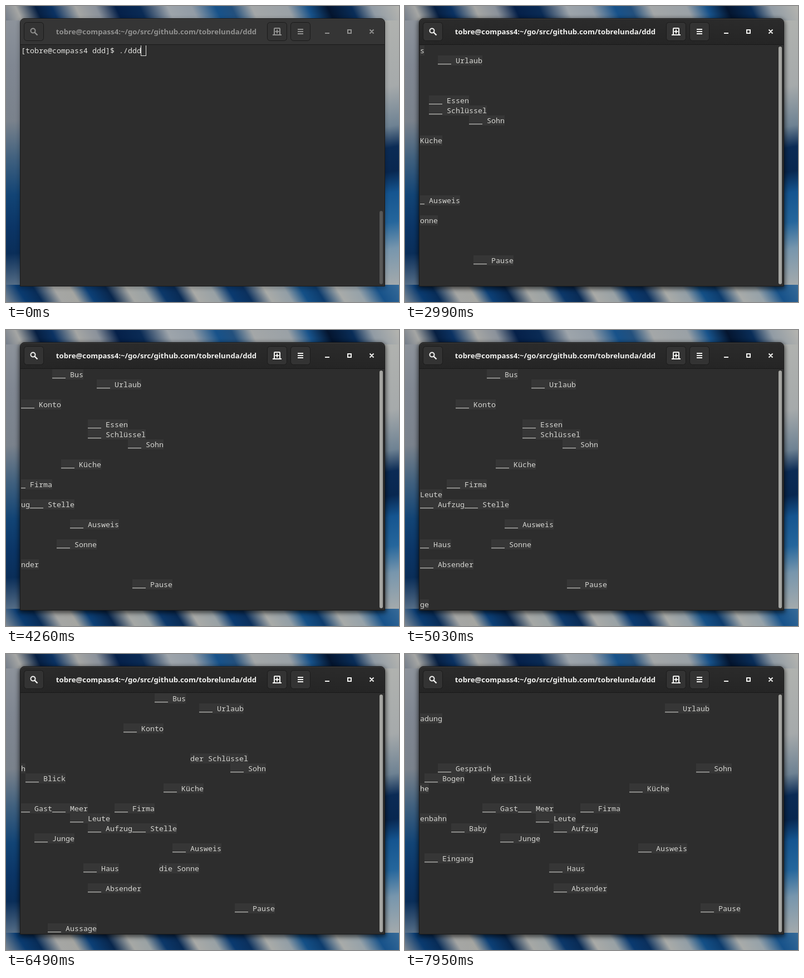
Recreate the animation shown at these times as an HTML page. Size 706 px wide and 533 px high, loop 8 s.

```html
<!DOCTYPE html>
<html lang="de">
<head>
<meta charset="utf-8">
<title>Terminal word game</title>
<style>
html, body { margin: 0; width: 100%; height: 100%; overflow: hidden; }
body {
  position: relative;
  --navy: #061f42; --blue: #17528a; --sand: #a5a6a4;
  background:
    linear-gradient(65deg, #747d8a, var(--sand) 4%, var(--navy) 9%, #0b3262 13%, var(--sand) 19%, #8b929b 24%, #052049 29%, #0a2b55 35%, #9ea5ab 42%, #929ca6 48%, var(--blue) 54%, #23507d 58%, #a4a7a8 63%, #9aa1a6 72%, var(--blue) 77%, #04152f 82%, #092d58 88%, #919ba4 93%, #b5b5b0) 0 0 / 706px 26px no-repeat,
    linear-gradient(58deg, #7e8994, #0a3b70 5%, #082c57 9%, var(--sand) 14%, #a4a5a1 18%, #0c4077 22%, #08264c 27%, #a6a8a5 32%, #9aa2a4 36%, #0c386a 40%, #092b55 44%, #a9aaa7 48%, #98a1a5 53%, #0a3a70 57%, #0b305d 61%, #a9aba8 66%, #929ea6 71%, #145087 75%, #0d3c6d 79%, #a8aba9 84%, #96a2a9 89%, var(--blue) 94%, #376b98) 0 502px / 706px 31px no-repeat,
    linear-gradient(177deg, #8d939b, #808792 17%, #7a828c 38%, #41617f 52%, #124475 66%, #0b3566 78%, #0a2e59 88%, #566e87) 0 26px / 27px 476px no-repeat,
    linear-gradient(170deg, #b0b2af, #a6aaab 25%, #6e8293 40%, #0b2b55 48%, #082750 57%, #155590 65%, #25669c 76%, #7796ad 86%, #a4aaac) 679px 26px / 27px 476px no-repeat,
    var(--navy);
}
#window {
  --f: 0;
  --ink: color-mix(in srgb, #f2f2f0 calc(var(--f) * 100%), #919190);
  position: absolute; left: 25px; top: 22px; width: 654px; height: 481px;
  border: 1px solid #1a1a1a; border-radius: 8px 8px 0 0; background: #2d2d2d;
  box-shadow: 0 3px 9px 1px rgba(0, 0, 0, calc(var(--f) * .5)), 0 2px 6px 2px rgba(0, 0, 0, .2);
}
#header {
  position: absolute; inset: 0 0 auto; height: 46px; border-bottom: 1px solid #191919;
  border-radius: 7px 7px 0 0; color: var(--ink);
  background: linear-gradient(color-mix(in srgb, #2b2b2b calc(var(--f) * 100%), #353535), color-mix(in srgb, #252525 calc(var(--f) * 100%), #353535));
  box-shadow: inset 0 1px #3b3b3b;
}
#title {
  position: absolute; left: 54px; width: 380px; line-height: 46px; text-align: center;
  font: bold 13.2px/46px "Noto Sans", sans-serif; white-space: pre;
}
#header svg { position: absolute; left: 0; top: 0; }
#terminal {
  position: absolute; left: 1px; top: 48px; width: 644px; height: 433px; overflow: hidden;
  font: 13.333px/18px "Noto Sans Mono", monospace; color: #d5d5d1; white-space: pre;
}
#terminal span { position: absolute; height: 18px; background: #363636; }
#prompt { position: absolute; left: 0; top: 0; color: #e4e4e1; }
#cursor {
  position: absolute; left: 215px; top: -1px; width: 8px; height: 18px; border: 1px solid #e4e4e1;
  background: rgba(228, 228, 225, var(--f));
}
#thumb {
  position: absolute; left: 645px; width: 6px; bottom: 3px; border-radius: 3px;
  background: color-mix(in srgb, #a5a5a1 calc(var(--f) * 100%), #575756);
}
</style>
</head>
<body>
<div id="window">
  <div id="header">
    <svg width="654" height="46" fill="none" stroke="currentColor" stroke-width="2">
      <g fill="#333" stroke="#1b1b1b" stroke-width="1">
        <rect x="6.5" y="6.5" width="35" height="33" rx="5"/>
        <rect x="443.5" y="6.5" width="35" height="33" rx="5"/>
        <rect x="485.5" y="6.5" width="35" height="33" rx="5"/>
      </g>
      <circle cx="22.5" cy="21.5" r="4"/>
      <path d="M25.5 24.5l5 5" stroke-width="2.4"/>
      <path d="M456 29V18q0-1 1-1h8q1 0 1 1v11M453 29h16M461 19.500v7M457.500 23h7"/>
      <path d="M498 19h10M498 23h10M498 27h10"/>
      <path d="M547 26h8M588 20h6v6h-6zM627.500 19.500l7 7M634.500 19.500l-7 7"/>
    </svg>
    <div id="title">tobre@compass4:~/go/src/github.com/tobrelunda/ddd</div>
  </div>
  <div id="terminal"><div id="prompt">[tobre@compass4 ddd]$ ./ddd<div id="cursor"></div></div></div>
  <div id="thumb"></div>
</div>
<script>
const LOOP = 8000, START = 750, STEP = 97.25, CELL = 8, ROW = 18;
const SOLVED_STEPS = 4;

// noun, row, step at which it reaches column 0, then article and step of the answer
const words = [
  ["Pause", 21, 12], ["Sohn", 7, 13], ["Urlaub", 1, 20],
  ["Essen", 5, 22, "das", 55], ["Schlüssel", 6, 22, "der", 59],
  ["Ausweis", 15, 26], ["Küche", 9, 28], ["Sonne", 17, 29, "die", 57],
  ["Bus", 0, 30, "der", 61], ["Stelle", 13, 35, "die", 64],
  ["Konto", 3, 37, "das", 70], ["Firma", 11, 39], ["Aufzug", 13, 45],
  ["Absender", 19, 45], ["Haus", 17, 46], ["Leute", 12, 49],
  ["Meer", 11, 53], ["Aussage", 23, 54, "die", 68], ["Junge", 14, 57],
  ["Blick", 8, 59, "der", 73], ["Gast", 11, 61], ["Baby", 13, 68],
  ["Gespräch", 7, 71], ["Bogen", 8, 74], ["Eingang", 16, 74],
  ["Sache", 9, 82], ["Einladung", 2, 83], ["Straßenbahn", 12, 84]
].map(([noun, row, entry, article, solved = Infinity]) => {
  const el = document.createElement("span");
  el.style.top = row * ROW + "px";
  el.style.width = (noun.length + 4) * CELL + "px";
  document.getElementById("terminal").append(el);
  return { el, noun, entry, article, solved };
});

const $ = id => document.getElementById(id);

function draw(time) {
  const focus = Math.max(0, Math.min(5, Math.floor((time - 220) / 52.5) + 1)) / 5;
  const step = Math.max(0, Math.floor((time - START) / STEP) + 1);
  const running = step > 0;

  $("window").style.setProperty("--f", focus);
  $("prompt").hidden = running;
  $("thumb").style.height = (running ? 428 : 132) + "px";

  for (const { el, noun, entry, article, solved } of words) {
    const col = step - entry;
    el.hidden = !running || col <= -noun.length - 4 || step >= solved + SOLVED_STEPS;
    el.style.left = col * CELL + "px";
    el.textContent = (step >= solved ? article : "___") + " " + noun;
  }
}

const begin = performance.now();
function tick() {
  draw((performance.now() - begin) % LOOP);
  requestAnimationFrame(tick);
}
tick();
</script>
</body>
</html>
```
